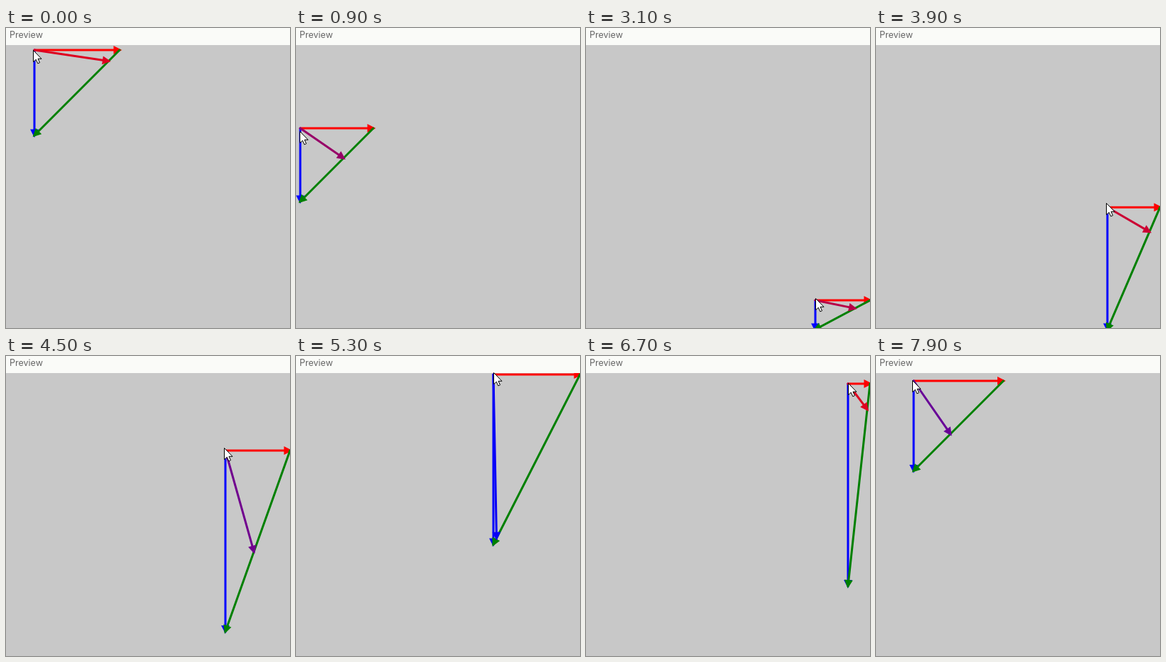
Animation of 400 by 422 pixels, one loop 8 s. Source, as an HTML page with a canvas:

```html
<!DOCTYPE html>
<html lang="en">
<head>
<meta charset="utf-8">
<title>Vector lerp preview</title>
<style>
  html, body { margin: 0; width: 100%; height: 100%; overflow: hidden; background: #c8c8c8; }
  canvas { position: absolute; left: 0; top: 0; }
  header {
    position: absolute; left: 0; top: 0; width: 400px; height: 24px;
    box-sizing: border-box; padding-left: 5px;
    background: #fafbf8; color: #666;
    font: 12.5px/20px Inter, "Open Sans", sans-serif;
  }
</style>
</head>
<body>
<header>Preview</header>
<canvas id="stage" width="400" height="422"></canvas>
<script>
const ctx = document.getElementById('stage').getContext('2d');
const LOOP = 8000, STEP = 100;
const TOP = 24, RIGHT = 400, BOTTOM = 424;
const LAG = 20; // the drawing trails the pointer by this many ms

// pointer path: time, x, y
const path = [
  [0, 40, 31], [400, 16, 52], [900, 6, 141], [1400, 9, 325],
  [1700, 37, 387], [1800, 85.5, 402], [2200, 170, 411], [2700, 266, 404],
  [3100, 323, 383], [3600, 335, 320], [4100, 318, 205], [4500, 309, 133],
  [4900, 280, 82], [5200, 271, 49], [5300, 278, 26], [5500, 290, 15],
  [5900, 322, 25], [6300, 350, 40], [6700, 369, 39], [7000, 380, 45],
  [7200, 384, 45], [7400, 290, 58], [7600, 150, 52], [7800, 59, 38],
  [7900, 53, 35], [8000, 51, 34]
];

// monotone slope at key i for column c
function slope(i, c) {
  const a = path[i - 1], b = path[i], d = path[i + 1];
  const left = a && (b[c] - a[c]) / (b[0] - a[0]);
  const right = d && (d[c] - b[c]) / (d[0] - b[0]);
  if (!a) return right;
  if (!d) return left;
  return left * right <= 0 ? 0 : 2 * left * right / (left + right);
}

function pointerAt(time) {
  const t = Math.min(time, LOOP);
  let i = 0;
  while (i < path.length - 2 && path[i + 1][0] <= t) i++;
  const a = path[i], b = path[i + 1];
  const span = b[0] - a[0], u = (t - a[0]) / span;
  const at = c =>
    a[c] * (1 + 2 * u) * (1 - u) ** 2 + b[c] * u * u * (3 - 2 * u) +
    span * (slope(i, c) * u * (1 - u) ** 2 + slope(i + 1, c) * u * u * (u - 1));
  return { x: at(1), y: at(2) };
}

// bounces between 0 and 1
function amountAt(time) {
  const phase = (1.87 + 0.5975 * time / 1000) % 2;
  return phase > 1 ? 2 - phase : phase;
}

function arrow(from, to, color) {
  const dx = to.x - from.x, dy = to.y - from.y;
  const size = 7;
  ctx.save();
  ctx.strokeStyle = ctx.fillStyle = color;
  ctx.lineWidth = 3;
  ctx.lineCap = 'round';
  ctx.translate(from.x, from.y);
  ctx.beginPath();
  ctx.moveTo(0, 0);
  ctx.lineTo(dx, dy);
  ctx.stroke();
  ctx.rotate(Math.atan2(dy, dx));
  ctx.translate(Math.hypot(dx, dy) - size, 0);
  ctx.beginPath();
  ctx.moveTo(0, size / 2);
  ctx.lineTo(0, -size / 2);
  ctx.lineTo(size, 0);
  ctx.closePath();
  ctx.fill();
  ctx.stroke();
  ctx.restore();
}

const cursor = new Path2D('M0 0V16.2L3.8 12.8L6.3 18.4L9 17.2L6.5 11.8H11.5Z');

function drawCursor({ x, y }) {
  ctx.save();
  ctx.translate(Math.round(x) - 0.5, Math.round(y) - 0.5);
  ctx.fillStyle = '#fff';
  ctx.strokeStyle = '#000';
  ctx.lineWidth = 1;
  ctx.fill(cursor);
  ctx.stroke(cursor);
  ctx.restore();
}

function draw(time) {
  const base = pointerAt(time);
  const reach = 100 + base.x / 2;
  const across = { x: Math.min(base.x + reach, RIGHT), y: base.y };
  const down = { x: base.x, y: Math.min(base.y + reach, BOTTOM) };
  const k = amountAt(time);
  const mid = {
    x: across.x + (down.x - across.x) * k,
    y: across.y + (down.y - across.y) * k
  };

  ctx.clearRect(0, 0, 400, 422);
  ctx.save();
  ctx.beginPath();
  ctx.rect(0, TOP, RIGHT, BOTTOM - TOP);
  ctx.clip();
  arrow(base, across, 'red');
  arrow(base, down, 'blue');
  arrow(across, down, 'green');
  arrow(base, mid, `rgb(${Math.round(255 * (1 - k))}, 0, ${Math.round(255 * k)})`);
  ctx.restore();
  drawCursor(pointerAt(time + LAG));
}

const start = performance.now();
function tick() {
  const time = (performance.now() - start) % LOOP;
  draw(Math.floor(time / STEP) * STEP);
  requestAnimationFrame(tick);
}
tick();
</script>
</body>
</html>
```
